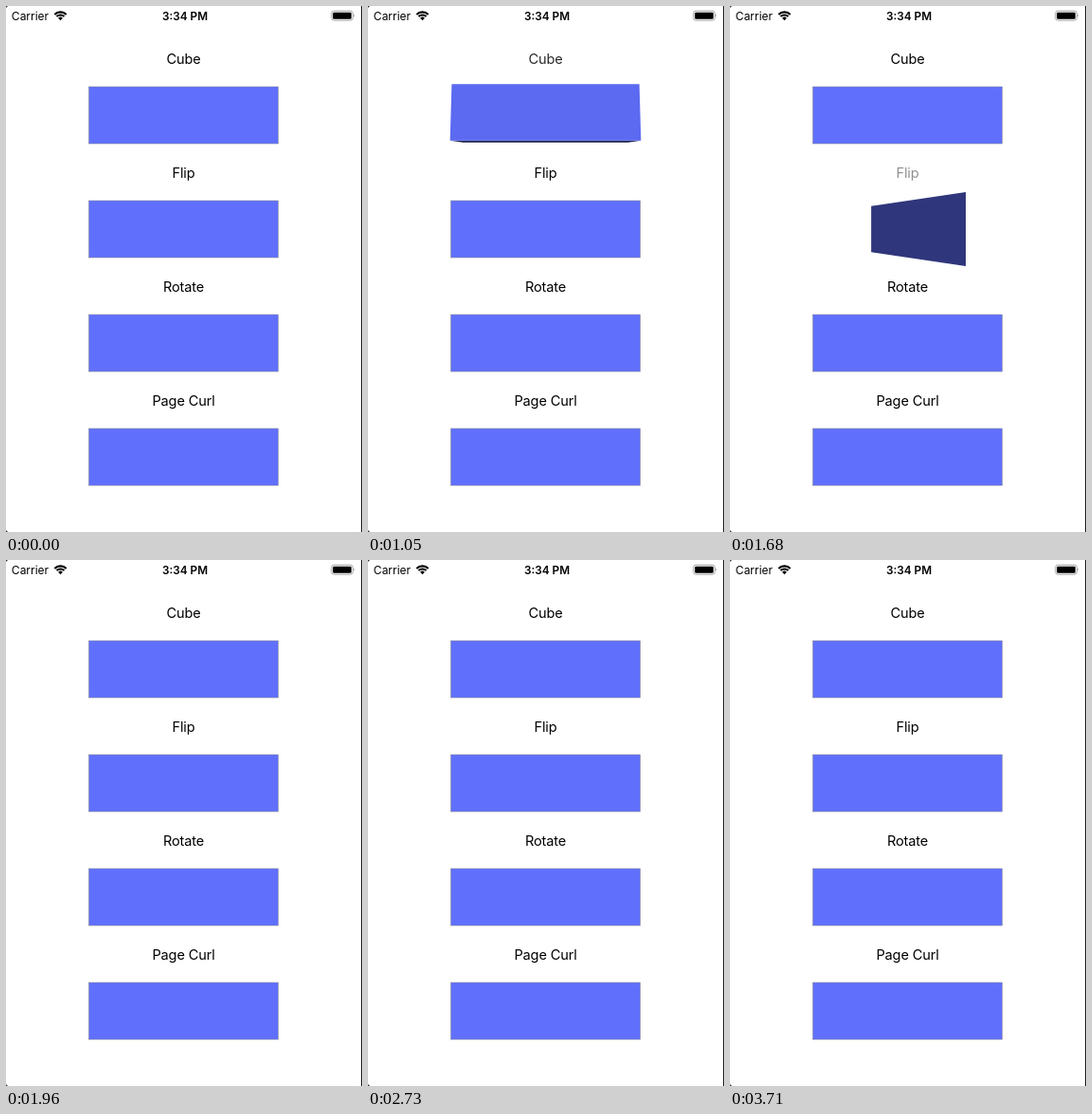
Write an HTML page that moves like this. It is 376 px wide and 554 px high and loops after 3780 ms.

```html
<!DOCTYPE html>
<html lang="en">
<head>
<meta charset="utf-8">
<title>Transitions</title>
<style>
  html, body { margin: 0; width: 100%; height: 100%; overflow: hidden; background: #fff; }
  svg { display: block; width: 376px; height: 554px; }
  text { font-family: Inter, Roboto, sans-serif; text-anchor: middle; }
  .label { font-size: 14.6px; letter-spacing: -.16px; }
</style>
</head>
<body>
<svg viewBox="0 0 376 554">
  <rect width="376" height="554" fill="#fff"/>
  <g id="status">
    <text x="25.5" y="15" font-size="12">Carrier</text>
    <text x="189" y="14.6" font-size="11.8" font-weight="600">3:34 PM</text>
    <g fill="none" stroke="#000" stroke-width="2.1">
      <path d="M51.3 8.9A8.8 8.8 0 0 1 63.7 8.9"/>
      <path d="M53.5 11.1A5.7 5.7 0 0 1 61.5 11.1"/>
    </g>
    <path d="M57.5 15.2L55.1 12.8A3.4 3.4 0 0 1 59.9 12.8Z"/>
    <rect x="343.7" y="5.2" width="22.6" height="10" rx="2.6" fill="none" stroke="#999" stroke-width=".9"/>
    <rect x="345.2" y="6.7" width="19.6" height="7" rx="1.3"/>
    <path d="M367.4 8.6Q369 10.2 367.4 11.8Z" fill="#888"/>
  </g>
  <g id="rows"></g>
  <rect x="375" width="1" height="554" fill="#222"/>
  <path d="M0 0H2L0 2ZM0 554H2L0 552Z" fill="#333"/>
</svg>
<script>
const LOOP = 3780, STEP = 70, SPAN = 300, FADE = 350;
const CX = 187.5, W = 100, H = 30, EYE = 380;
const BLUE = [96, 112, 253], PALE = [176, 184, 255];

const clamp = v => Math.max(0, Math.min(1, v));
const rgb = (c, k = 1) => `rgb(${c.map(v => Math.round(v * k))})`;
const shade = angle => 1 - .75 * Math.abs(angle) / (Math.PI / 2);

// Perspective polygon from [x, y, z] corners around a row's centre.
function poly(cy, points, fill) {
  const list = points.map(([x, y, z]) => {
    const k = EYE / (EYE - z);
    return `${(CX + x * k).toFixed(2)},${(cy + y * k).toFixed(2)}`;
  });
  return `<polygon points="${list.join(' ')}" fill="${fill}"/>`;
}

const band = (cy, y1, z1, y2, z2, fill) =>
  poly(cy, [[-W, y1, z1], [W, y1, z1], [W, y2, z2], [-W, y2, z2]], fill);

function still(cy) {
  return `<rect x="${CX - W}" y="${cy - H}" width="${2 * W}" height="${2 * H}"
    fill="${rgb(BLUE)}" stroke="#85889c" stroke-width=".6"/>`;
}

function cube(cy, p) {
  const turn = p * Math.PI / 2;
  return [turn, turn - Math.PI / 2]
    .sort((a, b) => Math.abs(b) - Math.abs(a))
    .map(a => {
      const c = Math.cos(a), s = Math.sin(a);
      return band(cy, H * (s - c), H * (c + s - 1), H * (s + c), H * (c - s - 1),
        rgb(BLUE, shade(a)));
    }).join('');
}

function flip(cy, p) {
  const a = p * Math.PI, x = W * Math.cos(a), z = W * Math.sin(a);
  const tilt = Math.min(a, Math.PI - a);
  return poly(cy, [[-x, -H, -z], [x, -H, z], [x, H, z], [-x, H, -z]],
    rgb(BLUE, shade(tilt)));
}

function rotate(cy, p) {
  const blade = (angle, alpha) => `<rect x="${-W}" y="${-H}" width="${2 * W}" height="${2 * H}"
    transform="translate(${CX} ${cy}) rotate(${angle})" fill="${rgb(BLUE)}" opacity="${alpha}"/>`;
  return blade(90 * p - 90, p) + blade(90 * p, 1 - p);
}

// The sheet rolls down over a cylinder of radius R.
function curl(cy, p) {
  const R = 20, N = 30, fold = -H + 69 * p;
  const bend = y0 => {
    const s = fold - y0, a = s / R;
    if (s <= 0) return [y0, 0, 0];
    if (a > Math.PI) return [fold + s - Math.PI * R, 2 * R, Math.PI];
    return [fold - R * Math.sin(a), R * (1 - Math.cos(a)), a];
  };
  let sheet = '';
  for (let i = N; i > 0; i--) {
    const [y1, z1] = bend(-H + 2 * H * i / N);
    const [y2, z2, a] = bend(-H + 2 * H * (i - 1) / N);
    const fill = a > Math.PI / 2
      ? rgb(PALE, .72 + .28 * Math.sin(a - Math.PI / 2))
      : rgb(BLUE, 1 - .3 * Math.sin(a));
    sheet += band(cy, y1, z1, y2, z2, fill);
  }
  return still(cy) + `<g opacity="${clamp((1 - p) * 4)}">${sheet}</g>`;
}

const rows = [
  { name: 'Cube', press: 771, start: 771, draw: cube },
  { name: 'Flip', press: 1530, start: 1577, draw: flip },
  { name: 'Rotate', press: 2300, start: 2382, draw: rotate },
  { name: 'Page Curl', press: 3070, start: 3130, draw: curl }
];

function row({ name, press, start, draw }, i, t) {
  const cy = 115 + 120 * i, p = (t - start) / SPAN;
  const alpha = t < press ? 1 : .2 + .8 * clamp((t - start) / FADE);
  return `<text class="label" x="${CX}" y="${cy - 54}" opacity="${alpha}">${name}</text>`
    + (p > 0 && p < 1 ? draw(cy, p) : still(cy));
}

const stage = document.getElementById('rows');
let last = -1;

function render(now) {
  const t = Math.floor(now % LOOP / STEP) * STEP;
  if (t !== last) {
    stage.innerHTML = rows.map((r, i) => row(r, i, t)).join('');
    last = t;
  }
}

const origin = performance.now();
function tick() {
  render(performance.now() - origin);
  requestAnimationFrame(tick);
}
tick();
</script>
</body>
</html>
```
